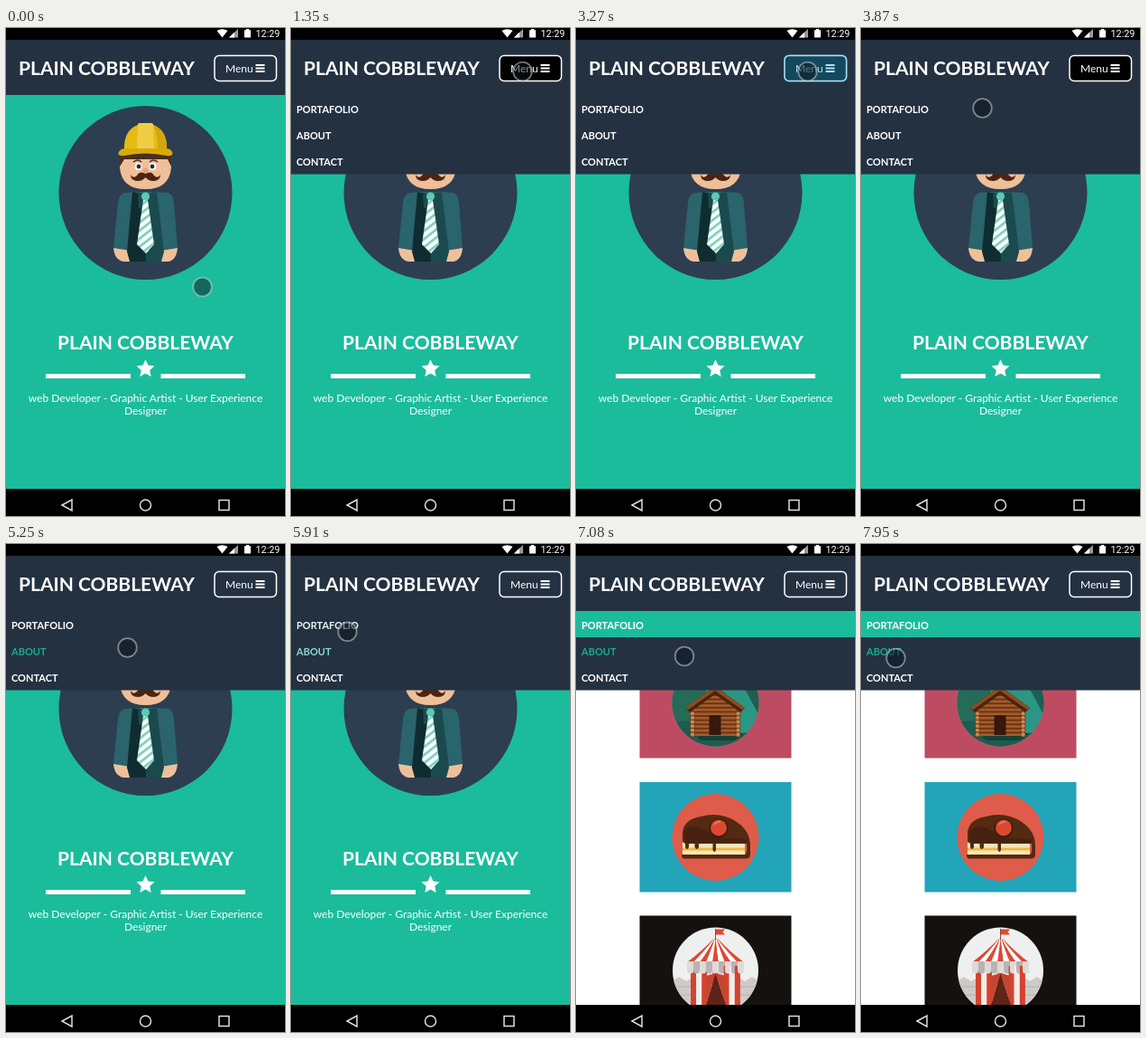
These frames come from a looping animation (309 px wide and 539 px high, 8000 ms). An HTML page:

```html
<!DOCTYPE html>
<html lang="en">
<head>
<meta charset="utf-8">
<title>Mobile menu</title>
<style>
  html, body { margin: 0; height: 100%; overflow: hidden; background: #000; }
  svg { display: block; width: 100vw; height: 100vh; font-family: Lato, sans-serif; fill: #fff; }
  .brand { font-size: 21px; font-weight: 700; }
  .small { font-size: 12px; }
  .link { font-size: 11px; font-weight: 700; }
  .mid { text-anchor: middle; }
</style>
</head>
<body>
<svg viewBox="0 0 309 539">
  <defs>
    <pattern id="stripes" width="7" height="7" patternUnits="userSpaceOnUse" patternTransform="rotate(-38)">
      <rect width="7" height="7" fill="#fff"/><rect width="7" height="2.8" fill="#7fd0c0"/>
    </pattern>
    <clipPath id="cabinClip"><circle cx="154.5" cy="175.5" r="48"/></clipPath>
    <clipPath id="tentClip"><circle cx="154.5" cy="471" r="47.5"/></clipPath>
  </defs>

  <g id="hero">
    <rect y="13" width="309" height="496" fill="#1abc9c"/>
    <circle cx="154.5" cy="182" r="96" fill="#2d3e50"/>
    <!-- jacket and hands -->
    <path d="M119 243L141 243 139 258 130 258Q120 256 119 243ZM190 243L168 243 170 258 180 258Q189 256 190 243Z" fill="#eec09a"/>
    <path d="M143 181L166 181 180 182Q185 184 186 193L190 243 171 246 172 258 137 258 138 246 119 243 124 193Q125 184 131 182Z" fill="#2a646c"/>
    <path d="M140 181L134 247 137 258 155 258 154 184Z" fill="#0f2d30"/>
    <path d="M167 181L175 247 172 258 155 258 154 184Z" fill="#1b4a4e"/>
    <path d="M146 180L154 188 163 180 162 199 147 199Z" fill="#1b4a4e"/>
    <path d="M152 190L157 190 164 239 155 249 145 239Z" fill="url(#stripes)"/>
    <circle cx="154.5" cy="186" r="4.6" fill="#5cc9b2"/>
    <!-- head -->
    <path d="M126 139H183V154Q181 178 154.5 178 128 178 126 154Z" fill="#eebf98"/>
    <path d="M126 139H183V153L179 145H131L126 153Z" fill="#4a2f20"/>
    <path d="M141 148Q146 144 150 148M159 148Q163 144 168 148" fill="none" stroke="#4a2f20" stroke-width="1.6"/>
    <circle cx="146.5" cy="153" r="4"/><circle cx="162.5" cy="153" r="4"/>
    <circle cx="147" cy="153" r="2.4" fill="#222d35"/><circle cx="162" cy="153" r="2.4" fill="#222d35"/>
    <circle cx="154.5" cy="157.5" r="3" fill="#dfa47d"/>
    <path d="M154.5 161Q148 157 145 163 141 167 138 162 138 169 146 169 151 169 154.5 165 158 169 163 169 171 169 171 162 168 167 164 163 161 157 154.5 161Z" fill="#4b2413"/>
    <!-- hard hat -->
    <path d="M131 135Q130 113 146 107L147 105H162L163 107Q179 113 178 135Z" fill="#e5bb15"/>
    <path d="M146 107L147 105H162L163 107 164 135H145Z" fill="#f0cd45"/>
    <path d="M163 107Q179 113 178 135H168Q169 118 163 107Z" fill="#d2a60d"/>
    <path d="M131 133H178Q184 134 184.500 138.500 184 142 178 141 154 136 131 141 125 142 124.500 138.500 125 134 131 133Z" fill="#d8ab0a"/>

    <text class="brand mid" x="154.5" y="355">PLAIN COBBLEWAY</text>
    <path d="M44 382H138V387H44ZM171.500 382H265V387H171.500Z"/>
    <path id="star"/>
    <text class="small mid" x="154.5" y="413">web Developer - Graphic Artist - User Experience</text>
    <text class="small mid" x="154.5" y="427">Designer</text>
  </g>

  <g id="folio">
    <rect y="13" width="309" height="496"/>
    <rect x="70.5" y="115" width="168" height="121.500" fill="#bd4c63"/>
    <g clip-path="url(#cabinClip)">
      <rect x="106" y="127" width="97" height="97" fill="#2c9684"/>
      <path d="M106 150H142L150 205 106 205Z" fill="#246b58"/>
      <path d="M172 150L188 162 203 190V150Z" fill="#1d5f52"/>
      <path d="M106 198Q125 191 150 204T203 203V224H106Z" fill="#1e5b50"/>
      <path d="M134 213Q155 205 186 209L176 217H138Z" fill="#164238"/>
      <path d="M154 161L180 184V211H128V184Z" fill="#6b3516"/>
      <g id="logs"></g>
      <rect x="147.5" y="189" width="13" height="22" fill="#34190c"/>
      <path d="M154 157L187 181 182 186 154 166 126 186 121 181Z" fill="#4a2410"/>
      <path d="M154 157L187 181 184 183 154 162 124 183 121 181Z" fill="#8f4c1f"/>
    </g>

    <rect x="70.5" y="263" width="168" height="121.500" fill="#22a4b9"/>
    <circle cx="154.5" cy="324" r="48" fill="#e05c4a"/>
    <path d="M118 329H187V345H118Z" fill="#f6e7b5"/>
    <path d="M118 335.500H187V338.500H118Z" fill="#edb84c"/>
    <path d="M118 329V318Q120 304 138 301 160 295 178 307 193 317 193 333V343Q193 347.500 188 347.500H119Q117 347 117 343H187Q190 342 189 331H155V338Q153.500 342 151.500 338V331H136V335Q134 339 131.500 335V331H125V335Q123 339 121 335V331Z" fill="#542a12"/>
    <path d="M120 317Q133 304 154 324L190 326 188 330H121Z" fill="#472110"/>
    <circle cx="158" cy="314" r="10.500" fill="#3c1a0d"/>
    <circle cx="158" cy="313.500" r="9" fill="#d84a30"/>
    <path d="M153 310Q156 306 160 307" fill="none" stroke="#ee8064" stroke-width="1.5"/>

    <rect x="70.5" y="410.500" width="168" height="99" fill="#15110f"/>
    <g clip-path="url(#tentClip)">
      <rect x="106" y="423" width="97" height="97" fill="#eeefef"/>
      <path d="M106 483L114 478 122 483 130 478V519H106ZM179 478L187 483 195 478 203 483V519H179Z" fill="#cfcac8"/>
      <path d="M106 489H203M106 498H203" stroke="#b8b1ae"/>
      <g id="tent"></g>
      <path d="M154.500 474L166 509H144Z" fill="#5d2417"/>
      <path d="M154.500 474L144 509V477ZM154.500 474L166 509V477Z" fill="#c74430"/>
      <path d="M154.500 437V425" stroke="#8b4a3a"/>
      <path d="M155 425.500H165L162.500 428.500 165 431.500H155Z" fill="#df4934"/>
    </g>
  </g>

  <rect id="scrollbar" x="304.500" y="97" width="2.500" height="83" fill="#777"/>

  <g id="menu">
    <rect y="73" width="309" height="88.500" fill="#243141"/>
    <rect id="active" y="74" width="309" height="29" fill="#1abc9c"/>
    <text class="link" x="6" y="94">PORTAFOLIO</text>
    <text class="link" x="6" y="123">ABOUT</text>
    <text class="link" x="6" y="152">CONTACT</text>
  </g>

  <rect y="13" width="309" height="61" fill="#243141"/>
  <text class="brand" x="14" y="52">PLAIN COBBLEWAY</text>
  <rect id="focus" x="231" y="30.500" width="68.500" height="28" rx="5"/>
  <rect x="231" y="30.500" width="68.500" height="28" rx="5" fill="none" stroke="#fff" stroke-width="1.5"/>
  <text class="small" x="243" y="49">Menu</text>
  <path d="M276.500 41H286.500M276.500 44.500H286.500M276.500 48H286.500" stroke="#fff" stroke-width="2"/>
  <rect id="tap" x="230" y="29.500" width="70.500" height="30" rx="5" fill="#33b5e5" opacity=".4"/>

  <circle id="cursor" r="10.300" fill="#0a141c" fill-opacity=".5" stroke="#c8d2d6" stroke-opacity=".55" stroke-width="1.8"/>

  <rect width="309" height="13" fill="#000"/>
  <path d="M233.500 3Q239.500 -.5 245.500 3L239.500 10.500Z"/>
  <path d="M247 10.500H257V1Z" fill="#999"/><path d="M247 10.500H253V4.800Z"/>
  <path d="M264 2.200H266V1H269V2.200H271V10.500H264Z"/>
  <text x="276.500" y="9.500" font-size="10.800" font-family="Roboto, sans-serif">12:29</text>
  <rect y="509" width="309" height="30" fill="#000"/>
  <path d="M62 527L73 521V533ZM236 521.500H247V532.500H236ZM148.500 527A6 6 0 1 0 160.500 527A6 6 0 1 0 148.500 527Z" fill="none" stroke="#ddd" stroke-width="1.5"/>
</svg>
<script>
const $ = id => document.getElementById(id);
const links = document.querySelectorAll('.link');
const LOOP = 8000;

// Static repeated parts
let star = '';
for (let i = 0; i < 10; i++) {
  const a = Math.PI * (i / 5 - .5), r = i % 2 ? 5 : 10.5;
  star += (i ? 'L' : 'M') + (154.5 + r * Math.cos(a)) + ' ' + (376.5 + r * Math.sin(a));
}
$('star').setAttribute('d', star + 'Z');

let logs = '';
for (let y = 168; y < 212; y += 4.6) {
  const half = Math.min(26, (y - 160) * 1.1);
  logs += `<rect x="${154 - half}" y="${y}" width="${half * 2}" height="2.6" fill="#a65c2a"/>`;
  if (y > 183) for (const x of [129, 179.5])
    logs += `<circle cx="${x}" cy="${y + 1}" r="2.6" fill="#cf8950" stroke="#5a2b13" stroke-width=".7"/>`;
}
$('logs').innerHTML = logs;

let tent = '';
for (let i = 0; i < 9; i++) {
  const x = 123 + i * 7, top = 152.5 + i * .5, wall = 127 + i * 6.1;
  const [roof, side, hem] = i % 2 ? ['#fff', '#f3ece8', '#b9b4b3'] : ['#df4934', '#d4432f', '#dedad8'];
  tent += `<path d="M${wall} 466h6.100v44h-6.100Z" fill="${side}"/>
    <path d="M${top} 436h.5Q${(top + x + 7) / 2} 451 ${x + 7} 462h-7Q${(top + x) / 2} 451 ${top} 436Z" fill="${roof}"/>
    <path d="M${x} 461h7v10a3.500 3.500 0 0 1-7 0Z" fill="${hem}"/>`;
}
$('tent').innerHTML = tent;

// Eased value at time t from [time, value...] keys
function at(t, keys) {
  const i = keys.findIndex(k => k[0] > t);
  if (i < 0) return keys[keys.length - 1].slice(1);
  if (!i) return keys[0].slice(1);
  const a = keys[i - 1], b = keys[i], s = (t - a[0]) / (b[0] - a[0]), e = s * s * (3 - 2 * s);
  return a.slice(1).map((v, j) => v + (b[j + 1] - v) * e);
}
const between = (t, a, b) => t >= a && t < b;
const show = (id, on) => $(id).style.display = on ? '' : 'none';

const path = [
  [0, 217.5, 286], [375, 217.5, 286], [450, 167, 170], [480, 165, 112], [510, 185, 86.5],
  [670, 185, 86.5], [1080, 256.5, 48], [3320, 256.5, 48], [3870, 134.5, 88.5],
  [4510, 134.5, 88.5], [4680, 134.5, 104.5], [4930, 134.5, 104.5], [5250, 134.5, 114.5],
  [5400, 140, 150.5], [5590, 140, 150.5], [6030, 45.5, 85], [6400, 45.5, 85],
  [7050, 120, 124], [7270, 120, 124], [7600, 82, 137], [7950, 38.5, 126]
];
const hover = [
  [[4150, 0], [4320, 1], [4930, 1], [5080, 0], [5880, 0], [6030, 1], [6269, 1], [6270, 0]],
  [[5050, 0], [5200, 1], [5300, 1], [5400, 0], [5680, 0], [5780, 1], [5860, 1], [5960, 0], [6920, 0], [7080, 1]],
  [[5310, 0], [5400, 1], [5620, 1], [5740, 0]]
];
const tint = k => `rgb(${[24, 172, 143].map(c => 255 + (c - 255) * k)})`;

function draw(now) {
  const t = now % LOOP, moved = t >= 6270;
  show('hero', !moved);
  show('folio', moved);
  show('active', moved);
  show('menu', between(t, 1350, 2310) || t >= 3270);
  show('tap', between(t, 2310, 2430) || between(t, 3270, 3330));
  $('focus').style.fill = '#000';
  $('focus').style.opacity = t < 1350 ? 0 : at(t, [[4150, 1], [4320, 0]])[0];
  $('scrollbar').style.opacity = moved ? at(t, [[6570, .65], [6870, 0]])[0] : 0;
  links.forEach((el, i) => el.style.fill = tint(at(t, hover[i])[0]));
  $('cursor').setAttribute('transform', `translate(${at(t, path)})`);
  requestAnimationFrame(draw);
}
draw(performance.now());
</script>
</body>
</html>
```
